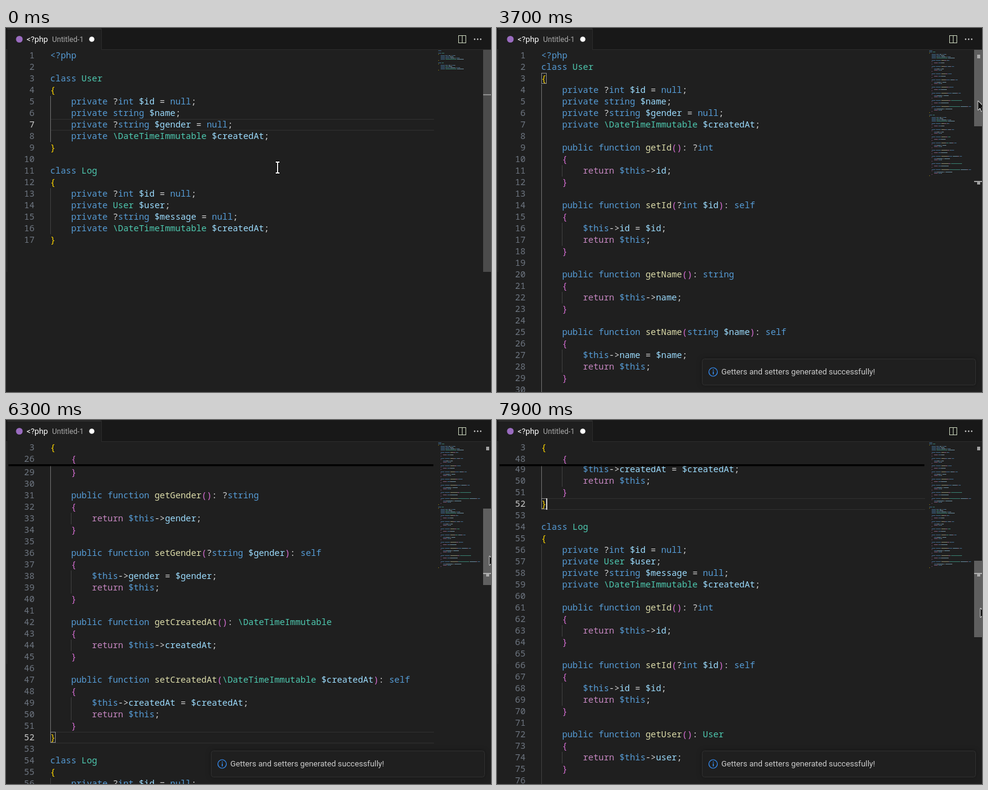
Recreate the animation shown at these times as an HTML page with a canvas. Size 800 by 600 pixels, loop 8 s.

```html
<!DOCTYPE html>
<html lang="en">
<head>
<meta charset="utf-8">
<title>Generate getters and setters</title>
<style>
  html, body { margin: 0; width: 100%; height: 100%; overflow: hidden; background: #1f1f1f; }
  canvas { display: block; }
</style>
</head>
<body>
<canvas id="stage" width="800" height="600"></canvas>
<script>
const ctx = document.getElementById('stage').getContext('2d');
const LOOP = 8000, TOP = 36, LINE = 19, CHAR = 8.6, LEFT = 73, VIEW = 564;
const MONO = '14.333px "Noto Sans Mono", monospace';
const ui = size => `${size}px Roboto, sans-serif`;
const BG = '#1f1f1f', TEXT = '#cccccc', BLUE = '#569cd6', LIGHT = '#9cdcfe', PINK = '#da70d6';

// ---- Code ----
function classLines(name, props, withAccessors) {
  const lines = [`class ${name}`, '{'];
  for (const p of props) {
    const [type, id] = p.split(' ');
    lines.push(`    private ${type} $${id}${type[0] === '?' ? ' = null' : ''};`);
  }
  if (withAccessors) for (const p of props) {
    const [type, id] = p.split(' ');
    const cap = id[0].toUpperCase() + id.slice(1);
    const method = (head, ...body) =>
      lines.push('', `    public function ${head}`, '    {', ...body.map(b => '        ' + b), '    }');
    method(`get${cap}(): ${type}`, `return $this->${id};`);
    method(`set${cap}(${type} $${id}): self`, `$this->${id} = $${id};`, 'return $this;');
  }
  return [...lines, '}'];
}

function tokenColor(word, line, at) {
  if (word === '$this') return BLUE;
  if (word[0] === '$' || line.slice(at - 2, at) === '->') return LIGHT;
  if (/^(<\?php|class|private|public|function|int|string|null|self)$/.test(word)) return BLUE;
  if (word === 'return') return '#c586c0';
  if (/^[{}()]$/.test(word)) return at ? PINK : '#ffd700';
  if (/^\w/.test(word) && line[at + word.length] === '(') return '#dcdcaa';
  return /^\\?[A-Z]/.test(word) ? '#4ec9b0' : '#d4d4d4';
}

function makeDocument(withAccessors) {
  const user = classLines('User', ['?int id', 'string name', '?string gender', '\\DateTimeImmutable createdAt'], withAccessors);
  const log = classLines('Log', ['?int id', 'User user', '?string message', '\\DateTimeImmutable createdAt'], withAccessors);
  const source = ['<?php', ...(withAccessors ? [] : ['']), ...user, '', ...log];
  let inside = false, classes = 0;
  const lines = source.map(text => {
    if (text === '}') inside = false;
    const line = {
      inside, first: classes < 2, body: text.startsWith('        '),
      tokens: [...text.matchAll(/<\?php|[$\\]?\w+|->|[^\w\s]/g)]
        .map(m => ({ text: m[0], col: m.index, color: tokenColor(m[0], text, m.index) }))
    };
    if (text === '{') inside = true;
    if (text.startsWith('class')) line.first = ++classes < 2;
    return line;
  });
  // Blocks that stick to the top while their body is in view
  const blocks = [];
  source.forEach((text, i) => {
    if (text.trim() !== '{') return;
    const close = source.indexOf(text.replace('{', '}'), i);
    blocks.push({ start: i, end: close, depth: text === '{' ? 0 : 1 });
  });
  return { lines, blocks, height: lines.length * LINE + VIEW - LINE,
           open: source.indexOf('{'), close: source.indexOf('}') };
}
const before = makeDocument(false), after = makeDocument(true);

// ---- Motion ----
const DRAG_START = 4000, DRAG_Y = 114, SCROLL_RATIO = 4.467;
const mousePath = [
  [100, 448, 230], [800, 412, 200], [1300, 412, 200], [2100, 538, 325], [2300, 541, 329],
  [2500, 541, 329], [2800, 478, 311], [3200, 706, 290], [3400, 788, 146], [3700, 793, 120],
  [3900, 794, 114], [4000, 794, 114], [4900, 796, 169], [6300, 797, 224], [7300, 796, 281], [7900, 797, 310]
];
function mouseAt(t) {
  const next = mousePath.findIndex(k => k[0] > t);
  if (next === 0) return { x: 448, y: 230 };
  if (next < 0) return { x: 797, y: 310 };
  const [t0, x0, y0] = mousePath[next - 1], [t1, x1, y1] = mousePath[next];
  const f = (t - t0) / (t1 - t0);
  return { x: Math.round(x0 + (x1 - x0) * f), y: Math.round(y0 + (y1 - y0) * f) };
}

// ---- Drawing helpers ----
function rect(x, y, w, h, color) { ctx.fillStyle = color; ctx.fillRect(x, y, w, h); }
function dot(x, y, r, color) {
  ctx.fillStyle = color; ctx.beginPath(); ctx.arc(x, y, r, 0, Math.PI * 2); ctx.fill();
}
function label(text, x, y, color, font, align = 'left') {
  ctx.font = font; ctx.fillStyle = color; ctx.textAlign = align; ctx.fillText(text, x, y);
}
function panel(x, y, w, h, r, fill, stroke, blur = 0) {
  ctx.save();
  ctx.beginPath(); ctx.roundRect(x, y, w, h, r);
  ctx.shadowColor = 'rgba(0,0,0,.36)'; ctx.shadowBlur = blur;
  ctx.fillStyle = fill; ctx.fill();
  ctx.shadowColor = 'transparent';
  if (stroke) { ctx.strokeStyle = stroke; ctx.lineWidth = 1; ctx.stroke(); }
  ctx.restore();
}
function outlined(path, fill, stroke, width) {
  ctx.lineJoin = 'round'; ctx.strokeStyle = stroke; ctx.lineWidth = width;
  ctx.stroke(path); ctx.fillStyle = fill; ctx.fill(path);
}

// ---- Editor parts ----
function drawLine(doc, i, y, current) {
  label(i + 1, 47, y + 14, i === current ? TEXT : '#6e7681', MONO, 'right');
  for (const k of doc.lines[i].tokens) label(k.text, LEFT + k.col * CHAR, y + 14, k.color, MONO);
}

function drawCode(doc, scroll, current, matched, caret) {
  ctx.save();
  ctx.beginPath(); ctx.rect(0, TOP, 787, VIEW); ctx.clip();
  doc.lines.forEach((line, i) => {
    const y = TOP + i * LINE - scroll;
    if (y < TOP - LINE || y > 600) return;
    if (i === current) {
      rect(LEFT, y, 633, 1, '#303030');
      rect(LEFT, y + LINE - 1, 633, 1, '#303030');
    }
    if (line.inside) rect(LEFT, y, 1, LINE, line.first ? '#707070' : '#404040');
    if (line.body) rect(107, y, 1, LINE, '#404040');
    if (matched && (i === doc.open || i === doc.close)) {
      ctx.strokeStyle = '#888'; ctx.lineWidth = 1;
      ctx.strokeRect(LEFT + .5, y + .5, 8, LINE - 2);
    }
    drawLine(doc, i, y, current);
    if (caret && i === current) rect(81, y, 2, LINE, '#d0d0d0');
  });
  if (scroll) drawSticky(doc, scroll, current);
  ctx.restore();
}

function drawSticky(doc, scroll, current) {
  const stuck = doc.blocks.filter(b => {
    const top = b.depth * LINE;
    return b.start * LINE - scroll < top && b.end * LINE - scroll >= top;
  });
  if (!stuck.length) return;
  let bottom = TOP;
  const placed = stuck.map(b => {
    const shift = Math.min(0, b.end * LINE - scroll - (b.depth + 1) * LINE);
    const y = TOP + b.depth * LINE + shift;
    bottom = Math.max(bottom, y + LINE);
    return { b, y };
  });
  const shade = ctx.createLinearGradient(0, bottom - 1, 0, bottom + 3);
  shade.addColorStop(0, '#000'); shade.addColorStop(.5, '#000'); shade.addColorStop(1, 'rgba(0,0,0,0)');
  rect(4, bottom - 1, 701, 4, shade);
  rect(2, TOP, 703, bottom - TOP - 1, BG);
  for (const p of placed.reverse()) {
    rect(2, p.y, 703, LINE - 1, BG);
    drawLine(doc, p.b.start, p.y, current);
  }
}

function drawMinimap(doc) {
  ctx.globalAlpha = .55;
  doc.lines.forEach((line, i) => {
    for (const k of line.tokens) rect(713 + k.col, 37 + i * 2, k.text.length, 1, k.color);
  });
  ctx.globalAlpha = 1;
}

function drawScrollbar(doc, offset, current, matched, color) {
  const scale = VIEW / doc.height;
  const markY = i => TOP + Math.round(i * LINE * scale);
  if (matched) for (const i of [doc.open, doc.close])
    rect(792, markY(i) - 1, 5, Math.max(6, LINE * scale), '#a0a0a0');
  rect(787, markY(current) - 1, 13, 2, '#a0a0a0');
  rect(787, TOP + offset, 13, Math.round(VIEW * scale), color);
}

function drawTabs() {
  rect(0, 0, 800, 35, '#181818');
  rect(0, 35, 800, 1, '#2b2b2b');
  rect(2, 1, 155, 35, BG);
  rect(2, 1, 155, 1, '#3c3c3c');
  rect(157, 1, 1, 35, '#2b2b2b');
  rect(1, TOP, 1, 366, '#2b2b2b');
  dot(22, 18.5, 5.5, '#9a6cc0');
  label('<?php', 34, 23, '#ffffff', ui(13.3));
  label('Untitled-1', 76, 23, '#a8a8a8', ui(12.2));
  dot(141.5, 18.5, 4.3, '#ffffff');
  ctx.strokeStyle = '#c5d0b8'; ctx.lineWidth = 1;
  ctx.strokeRect(746.5, 12.5, 12, 12);
  rect(752, 12, 1, 13, '#c5d0b8');
  for (const x of [773, 778, 783]) dot(x, 18.5, 1.2, TEXT);
}

// ---- Menu and toast ----
const menuItems = [
  [218, 'Change All Occurrences', 'Ctrl+F2'], [244, 'Refactor...', 'Ctrl+Shift+R'],
  [281, 'Generate Getters'], [307, 'Generate Setters'], [333, 'Generate Getters and Setters'],
  [370, 'Cut', 'Ctrl+X'], [396, 'Copy', 'Ctrl+C'], [422, 'Paste', 'Ctrl+V'],
  [459, 'Command Palette...', 'Ctrl+Shift+P']
];
function drawMenu(mouse) {
  panel(412.5, 200.5, 295, 276, 5, BG, '#454545', 8);
  for (const y of [262, 351, 440]) rect(413, y, 294, 1, '#454545');
  for (const [y, name, keys] of menuItems) {
    const hover = mouse.x > 416 && Math.abs(mouse.y - y) <= 13;
    if (hover) panel(417, y - 13, 286, 26, 4, '#0078d4');
    const color = hover ? '#ffffff' : TEXT;
    label(name, 443, y + 5, color, ui(13.3));
    if (keys) label(keys, 677, y + 5, color, ui(13), 'right');
  }
}

function drawToast() {
  panel(338.5, 545.5, 451, 43, 4, BG, '#303030', 8);
  ctx.strokeStyle = '#3794ff'; ctx.lineWidth = 1.2;
  ctx.beginPath(); ctx.arc(356.5, 567, 7, 0, Math.PI * 2); ctx.stroke();
  rect(356, 563, 1.4, 1.6, '#3794ff');
  rect(356, 566, 1.4, 5, '#3794ff');
  label('Getters and setters generated successfully!', 370, 571, TEXT, ui(13.2));
}

// ---- Pointers, with the hot spot at 0,0 ----
const arrow = new Path2D('M.5 .5V15l3.4-3.2 2.4 5.6 2.4-1-2.4-5.4h4.7z');
const beam = new Path2D('M-3-9H-1L0-8 1-9H3M-3 9H-1L0 8 1 9H3M0-8V8');
const hand = new Path2D('M-1.5 1Q0-1 1.5 1V7L9 9Q11 9.500 10.500 12L9 17H0L-6 10Q-6 8-4 8.500L-1.500 11Z');
function drawMouse({ x, y }, menuOpen) {
  ctx.save();
  ctx.translate(x, y);
  if (menuOpen && y > 206) outlined(hand, '#000', '#fff', 2);
  else if (menuOpen || x > 705) outlined(arrow, '#111', '#fff', 1.5);
  else {
    ctx.strokeStyle = '#000'; ctx.lineWidth = 4; ctx.stroke(beam);
    ctx.strokeStyle = '#fff'; ctx.lineWidth = 1.8; ctx.stroke(beam);
  }
  ctx.restore();
}

function draw(t) {
  const generated = t >= 2600, menuOpen = t >= 1200 && t < 2600, matched = t >= 1100;
  const doc = generated ? after : before;
  const current = matched ? doc.close : 6;
  const mouse = mouseAt(t);
  const dragging = t >= DRAG_START;
  const offset = dragging ? mouse.y - DRAG_Y : 0;
  const caret = dragging && t % 1000 >= 500;
  const thumb = t >= 3700 ? 'rgba(191,191,191,.4)' : 'rgba(121,121,121,.5)';

  rect(0, 0, 800, 600, BG);
  drawCode(doc, Math.round(offset * SCROLL_RATIO), current, matched, caret);
  drawMinimap(doc);
  drawScrollbar(doc, offset, current, matched, thumb);
  drawTabs();
  if (menuOpen) drawMenu(mouse);
  if (t >= 2700) drawToast();
  drawMouse(mouse, menuOpen);
}

const start = performance.now();
function tick() {
  const t = (performance.now() - start) % LOOP;
  draw(Math.floor(t / 100) * 100);
  requestAnimationFrame(tick);
}
tick();
</script>
</body>
</html>
```
